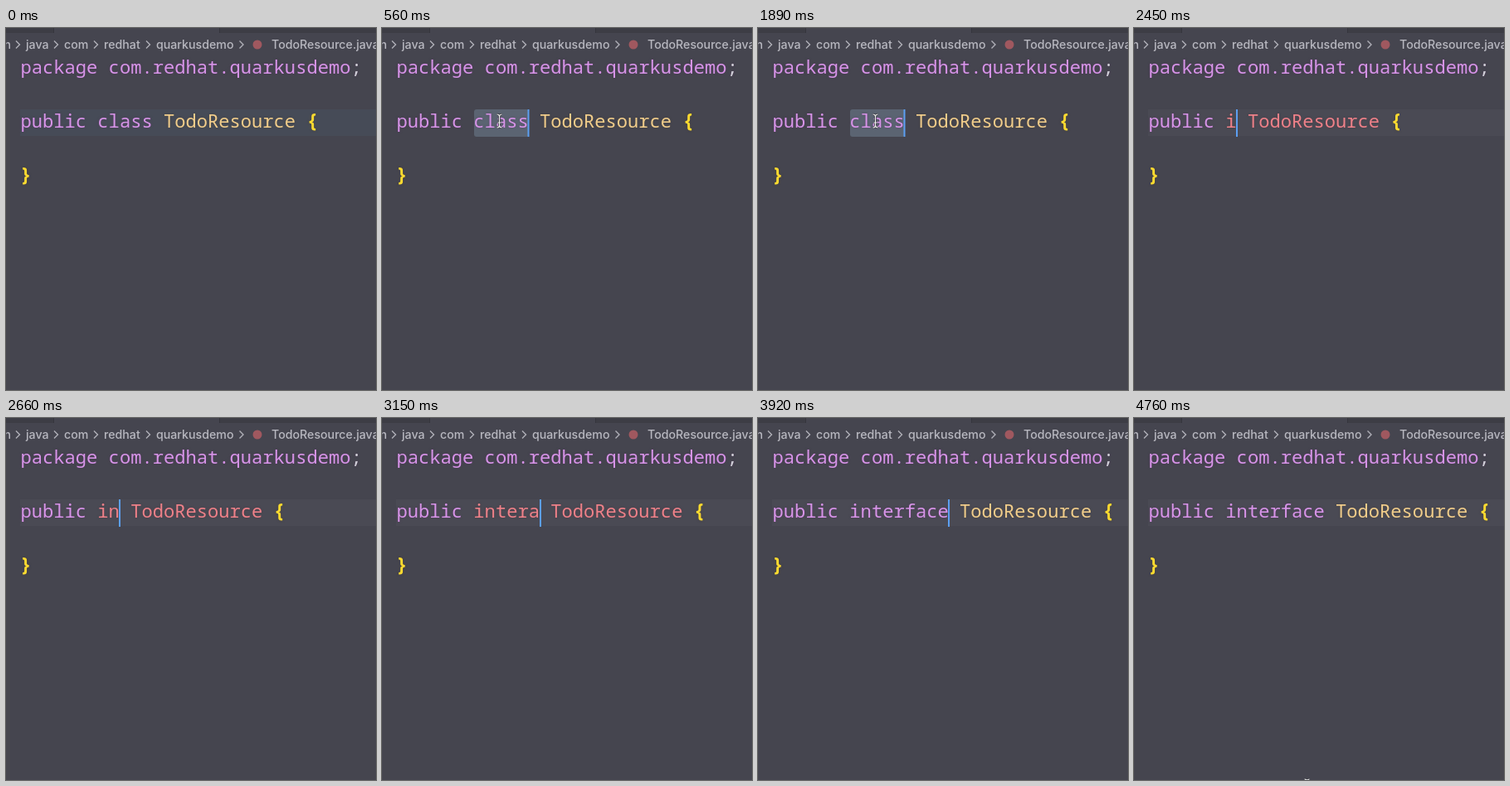
These frames come from a looping animation (446x436 px, 4.83 s). An HTML page:

```html
<!DOCTYPE html>
<html lang="en">
<head>
<meta charset="utf-8">
<title>Class to interface</title>
<style>
html, body { margin: 0; width: 100%; height: 100%; overflow: hidden; background: #45454f; }
svg { display: block; }
text { white-space: pre; }
.code { font: 500 22.12px "Noto Sans Mono", monospace; }
.crumb { font: 450 14.2px Inter, sans-serif; fill: #b8b8c0; }
.key { fill: #d794e8; text-shadow: 0 0 3px #5a306488; }
.type { fill: #f1cd8b; text-shadow: 0 0 3px #4a402c66; }
.bad { fill: #ee8189; text-shadow: 0 0 3px #5a303866; }
.brace { fill: #ffdb30; font-weight: 700; font-size: 23px; text-shadow: 0 0 3px #4a402c88; }
.punct { fill: #d2d1da; }
</style>
</head>
<body>
<svg width="446" height="436" viewBox="0 0 446 436">
  <path d="M0 0H446V6H0Z" fill="#3d3d45"/>
  <path d="M58 0H257V7H58Z" fill="#45454f"/>
  <path d="M57.5 0V6M257.5 0V6" stroke="#35353d"/>
  <g id="crumbs"></g>
  <circle cx="303" cy="20" r="5.5" fill="#a0585f"/>
  <rect id="line" x="17" y="98" width="429" height="32"/>
  <rect id="selection" x="111" y="98" width="66" height="33" rx="3" fill="#5b6472"/>
  <g class="code">
    <text x="17.5" y="55" class="key">package com.redhat.quarkusdemo<tspan class="punct">;</tspan></text>
    <text x="17.5" y="120"><tspan class="key">public </tspan><tspan id="word"></tspan><tspan id="name"> TodoResource</tspan> <tspan class="brace">{</tspan></text>
    <text x="17" y="184.5" class="brace">}</text>
  </g>
  <rect id="caret" y="98" width="2" height="33" fill="#5c9ff2"/>
  <g id="mouse" fill="none">
    <path id="beam" d="M-3-8Q0-8 0-5Q0-8 3-8M0-5V5M-3 8Q0 8 0 5Q0 8 3 8M-2 2H2"/>
    <use href="#beam" stroke="#33343c" stroke-width="2.6"/>
    <use href="#beam" stroke="#eee" stroke-width="1.2"/>
  </g>
</svg>
<script>
const LOOP = 4830, STEP = 70, PITCH = 13.27, SELECT = 560;
const $ = id => document.getElementById(id);

const crumbs = [[-2.5, "n"], [24, "java"], [70, "com"], [118, "redhat"],
  [181, "quarkusdemo"], [320, "TodoResource.java"]];
$("crumbs").innerHTML = crumbs.map(([x, s], i) =>
  `<text class="crumb" x="${x}" y="25.3">${s}</text>` +
  (i ? `<path d="M${i < 5 ? x - 12 : 281.5} 15.5l4.5 4.5l-4.5 4.5" fill="none" stroke="#b0b0b8" stroke-width="1.4"/>` : "")
).join("");

// Time of each edit and the word it leaves
const edits = [[0, "class"], [2450, "i"], [2590, "in"], [2730, "int"], [2800, "inte"],
  [2870, "inter"], [3080, "intera"], [3500, "inter"], [3570, "interf"],
  [3640, "interfa"], [3710, "interfac"], [3780, "interface"]];

const show = (id, on) => $(id).setAttribute("visibility", on ? "visible" : "hidden");
const mix = (a, b, p) => a + (b - a) * p;
const clamp = p => Math.min(1, Math.max(0, p));

function mouseAt(t) {
  if (t < 2450) {
    const p = 1 - (1 - clamp((t - 70) / 350)) ** 2;
    return [mix(440, 141.5, p), mix(255, 112, p)];
  }
  const p = 1 - (1 - clamp((t - 4200) / 560)) ** 1.7;
  return [mix(141.5, 208.5, p), mix(112, 443, p)];
}

function draw(t) {
  const [since, word] = edits.findLast(e => e[0] <= t);
  const typing = since > 0;
  const selected = t >= SELECT && !typing;
  const valid = word === "class" || word === "interface";

  $("word").textContent = word;
  $("word").setAttribute("class", valid ? "key" : "bad");
  $("name").setAttribute("class", valid ? "type" : "bad");

  show("line", !selected);
  $("line").setAttribute("fill", typing ? "#4a4a54" : "#464b57");
  show("selection", selected);

  const blink = (t - (typing ? since : SELECT)) % 1000 < 500;
  show("caret", t >= SELECT && blink);
  $("caret").setAttribute("x", Math.round(17 + PITCH * (7 + word.length)) - (typing ? 0 : 0.5));

  show("mouse", t >= 70 && !typing || t >= 4200);
  $("mouse").setAttribute("transform", `translate(${mouseAt(t)})`);
}

const start = performance.now();
function tick() {
  const t = (performance.now() - start) % LOOP;
  draw(Math.floor(t / STEP) * STEP);
  requestAnimationFrame(tick);
}
tick();
</script>
</body>
</html>
```
